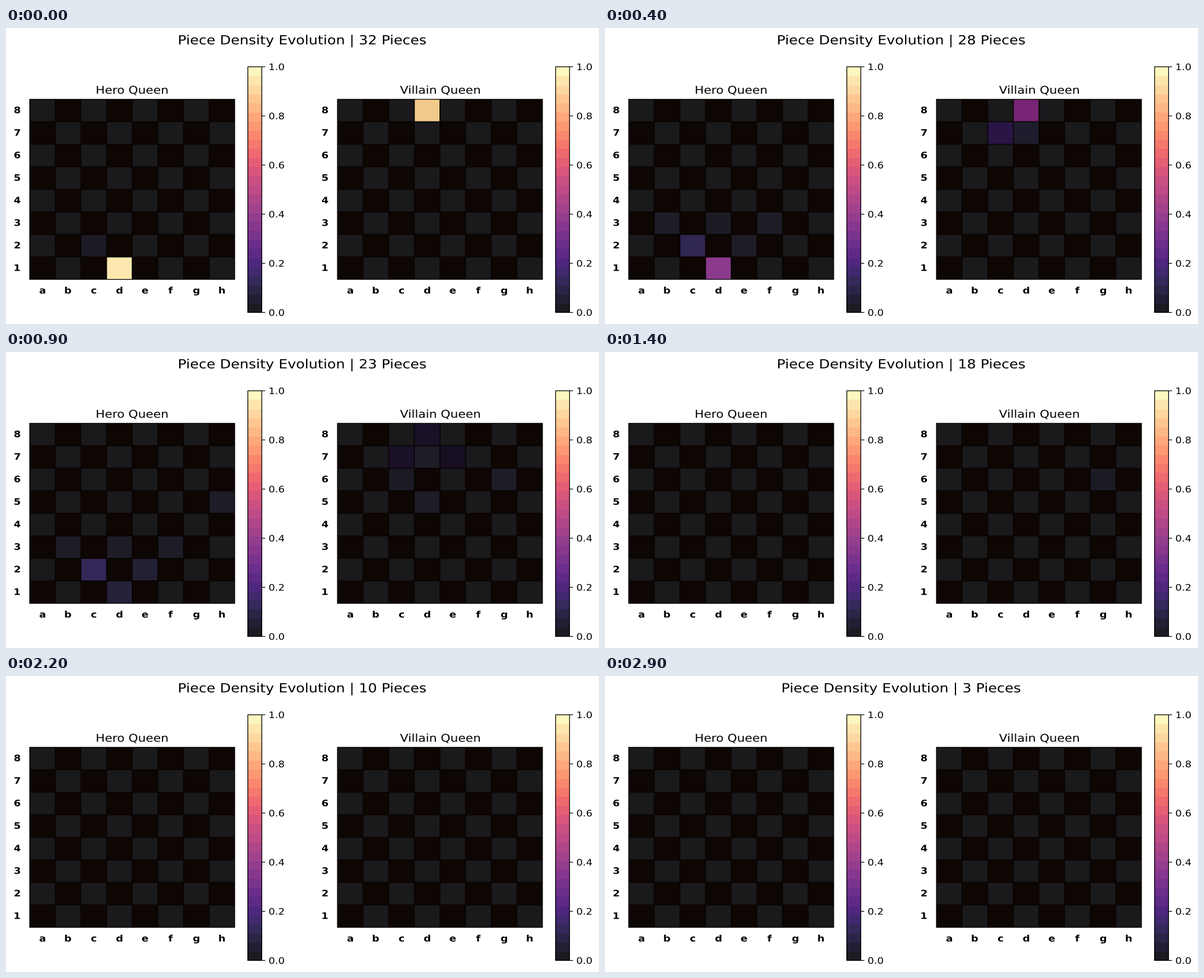
Recreate the animation shown at these times as a matplotlib script. Size 1000 by 500 pixels, loop 3 s.

```python
import numpy as np
import matplotlib.pyplot as plt
from matplotlib.animation import FuncAnimation
from matplotlib.patches import PathPatch, Rectangle
from matplotlib.textpath import TextPath
from matplotlib.transforms import Affine2D

W, H, DPI = 1000, 500, 100
FRAMES, INTERVAL = 30, 100
ALPHA = 0.9

# The whole scene is anamorphic: one point is wider than it is high.
CELL_W, CELL_H = 43.25, 38.06
POINT_H = 1.51
POINT_W = POINT_H * CELL_W / CELL_H

TOP = 120.3
BAR_TOP, BAR_BOTTOM, BANDS = 65.5, 480.5, 27
LIGHT, DARK = np.array([255, 250, 235]) / 255, np.array([125, 62, 0]) / 255
GRID = np.array([8, 4, 3]) / 255
MAGMA = plt.get_cmap("magma")
FILES = "abcdefgh"

# Queen density per square at the key steps, linear in between.
STEPS = [0, 4, 6, 9, 14, 16]
HERO = {
    "d1": [.95, .37, .22, .07, 0, 0],
    "c2": [.03, .12, .125, .125, 0, 0],
    "d2": [0, 0, .07, 0, 0, 0],
    "e2": [0, .035, .06, .06, 0, 0],
    "b3": [0, .035, .035, .035, 0, 0],
    "d3": [0, .03, .03, .035, 0, 0],
    "f3": [0, .035, .035, .035, 0, 0],
    "h5": [0, 0, 0, .035, 0, 0],
}
VILLAIN = {
    "d8": [.92, .345, .205, .085, 0, 0],
    "c7": [0, .14, .1, .085, 0, 0],
    "d7": [0, .045, .055, .035, 0, 0],
    "e7": [0, 0, 0, .07, 0, 0],
    "c6": [0, 0, 0, .03, 0, 0],
    "g6": [0, 0, 0, .035, .03, 0],
    "d5": [0, 0, .03, .035, 0, 0],
}

fig = plt.figure(figsize=(W / DPI, H / DPI), dpi=DPI, facecolor="white")
ax = fig.add_axes([0, 0, 1, 1])
ax.set(xlim=(0, W), ylim=(H, 0))
ax.axis("off")


def blend(value, base):
    return ALPHA * np.array(MAGMA(value)[:3]) + (1 - ALPHA) * base


def square_color(col, row, value):
    return blend(value, LIGHT if (col + row) % 2 else DARK)


def box(x0, y0, x1, y1, **style):
    return ax.add_patch(Rectangle((x0, y0), x1 - x0, y1 - y0, snap=False, **style))


def text_path(x, y, text, size, centered=True, weight="normal"):
    path = TextPath((0, 0), text, size=size,
                    prop={"family": "DejaVu Sans", "weight": weight})
    bounds = path.get_extents()
    shift = -(bounds.x0 + bounds.x1) / 2 if centered else 0
    place = Affine2D().translate(shift, 0).scale(POINT_W, -POINT_H).translate(x, y)
    return path.transformed(place)


def label(x, y, text, size=10, **layout):
    path = text_path(x, y, text, size, **layout)
    return ax.add_patch(PathPatch(path, fc="black", lw=0, snap=False))


def draw_board(left, title):
    """Draw one board and return its squares keyed by name."""
    right, bottom = left + 8 * CELL_W, TOP + 8 * CELL_H
    edge, inset = 0.5, 0.8
    box(left - edge, TOP - edge, right + edge, bottom + edge, fc=GRID, lw=0)
    squares = {}
    for col, letter in enumerate(FILES):
        x = left + col * CELL_W
        label(x + CELL_W / 2, 448.5, letter, weight="bold")
        for row in range(8):
            y = TOP + (7 - row) * CELL_H
            squares[f"{letter}{row + 1}"] = box(
                x + inset, y + inset, x + CELL_W - inset, y + CELL_H - inset,
                fc=square_color(col, row, 0), lw=0)
    for row in range(8):
        label(left - 20.8, TOP + (7.5 - row) * CELL_H + 4.6, str(row + 1),
              weight="bold")
    label((left + right) / 2, 111, title, size=12)
    return squares


def draw_colorbar(left):
    right = left + 23.6
    edges = np.linspace(BAR_BOTTOM, BAR_TOP, BANDS + 1)
    for i in range(BANDS):
        box(left, edges[i + 1], right, edges[i], lw=0, aa=False,
            fc=blend((i + 0.5) / BANDS, np.ones(3)))
    box(left, BAR_TOP, right, BAR_BOTTOM, fill=False, ec="black", lw=0.9)
    for value in np.linspace(0, 1, 6):
        y = BAR_BOTTOM + value * (BAR_TOP - BAR_BOTTOM)
        ax.plot([right, right + 5.8], [y, y], color="black", lw=0.85,
                solid_capstyle="butt", snap=False)
        label(right + 11.3, y + 5.6, f"{value:.1f}", centered=False)


def heading_path(step):
    return text_path(W / 2, 27.6, f"Piece Density Evolution | {32 - step} Pieces", 14)


boards = [(draw_board(39.8, "Hero Queen"), HERO),
          (draw_board(558.8, "Villain Queen"), VILLAIN)]
draw_colorbar(407.8)
draw_colorbar(926.8)
heading = ax.add_patch(PathPatch(heading_path(0), fc="black", lw=0, snap=False))


def update(step):
    heading.set_path(heading_path(step))
    for squares, density in boards:
        for name, values in density.items():
            value = np.interp(step, STEPS, values)
            if value < 0.02:
                value = 0
            col, row = FILES.index(name[0]), int(name[1]) - 1
            squares[name].set_facecolor(square_color(col, row, value))
    return []


anim = FuncAnimation(fig, update, frames=FRAMES, interval=INTERVAL,
                     repeat=True, repeat_delay=0, blit=False)
plt.show()
```
